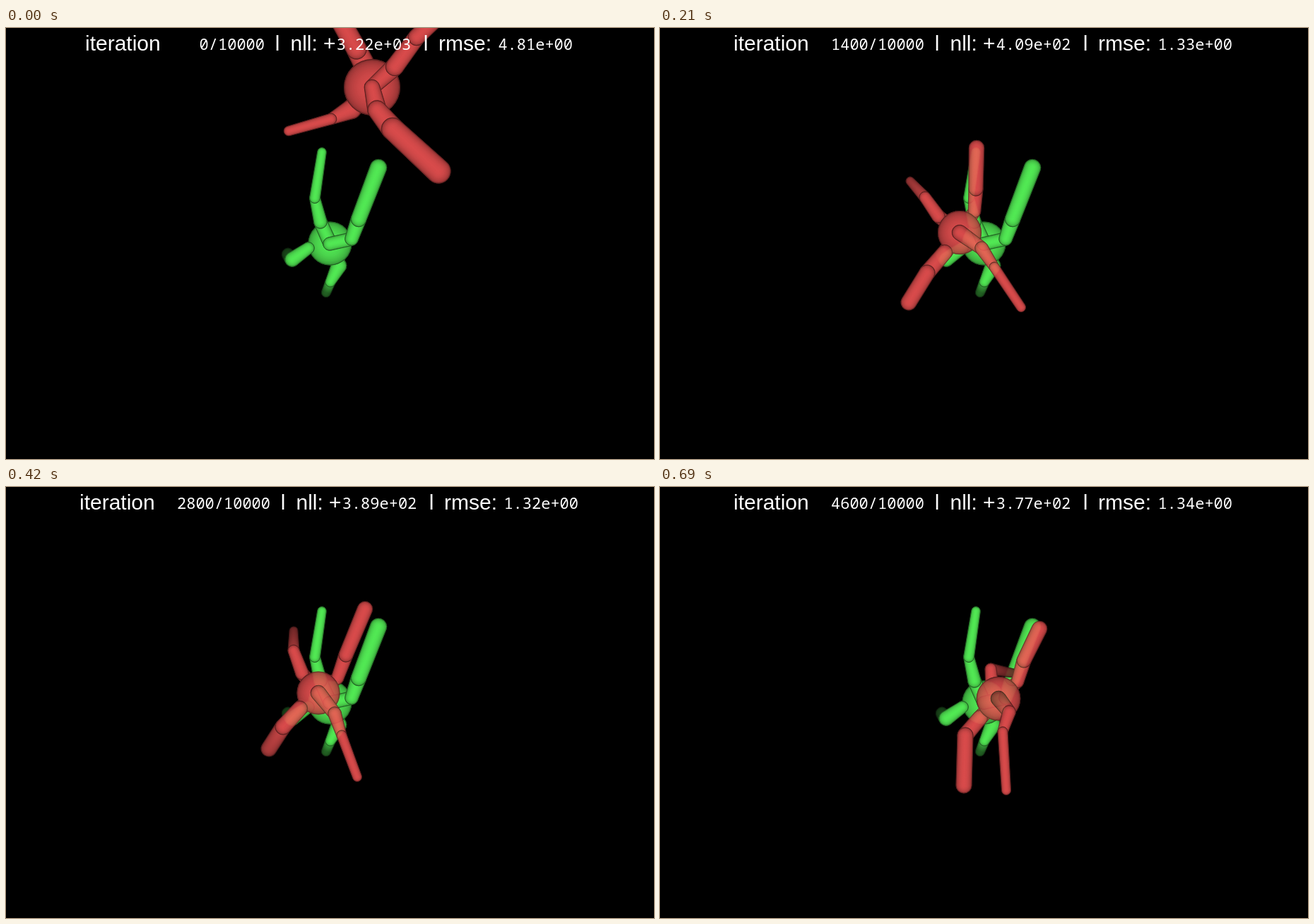
Write an HTML page with a canvas that moves like this. It is 917 px wide and 611 px high and loops after 1.72 s.

```html
<!DOCTYPE html>
<html lang="en">
<head>
<meta charset="utf-8">
<title>Pose fit</title>
<style>
html, body { margin: 0; width: 100%; height: 100%; overflow: hidden; background: #000; }
canvas { display: block; }
</style>
</head>
<body>
<canvas id="stage" width="917" height="611"></canvas>
<script>
const W = 917, H = 611, LOOP = 1720, STEP = 30, LAST = 23;
const stage = document.getElementById('stage').getContext('2d');
const layerCanvas = document.createElement('canvas');
layerCanvas.width = W;
layerCanvas.height = H;
const layer = layerCanvas.getContext('2d');

const RED = [246, 86, 86], GREEN = [82, 232, 84];
const SANS = '30px "Liberation Sans", Arial, sans-serif';
const MONO = '22px "Noto Sans Mono", monospace';

// Steps at which the poses below are reached.
const KEYS = [0, 3, 7, 10, 14, 17, 23];
const NLL = [3220, 360, 409, 421, 389, 387, 377];
const RMSE = [4.81, 1.23, 1.33, 1.33, 1.32, 1.18, 1.34];

// Torso: x, y, radius.
const TORSO = [
  [518, 84, 40], [434, 295, 31.3], [424, 290, 31], [432, 276, 30.5],
  [442, 292, 30.5], [436, 284, 31], [479, 300, 31.3]
];

// Legs: hip, knee and foot positions.
const UP = [
  [550, 55, 581, 13, 628, -32],
  [461, 271, 468, 238, 480, 170],
  [445, 260, 447, 228, 448, 170],
  [457, 250, 461, 217, 477, 155],
  [469, 271, 481, 238, 508, 173],
  [455, 252, 455, 221, 463, 162],
  [506, 276, 515, 246, 537, 201]
];
const LEFT = [
  [505, 48, 496, 30, 468, -20],
  [412, 268, 392, 236, 353, 193],
  [394, 267, 375, 240, 354, 217],
  [407, 252, 395, 220, 396, 198],
  [419, 264, 407, 232, 407, 204],
  [413, 266, 398, 246, 419, 246],
  [470, 285, 468, 258, 500, 264]
];
const DOWN = [
  [489, 115, 460, 129, 400, 146],
  [407, 318, 387, 352, 349, 381],
  [403, 318, 378, 347, 352, 389],
  [408, 301, 387, 331, 371, 375],
  [416, 314, 392, 340, 372, 371],
  [415, 314, 405, 346, 411, 408],
  [453, 327, 432, 352, 430, 423]
];
const RIGHT = [
  [525, 116, 547, 143, 612, 203],
  [459, 323, 473, 353, 489, 400],
  [455, 312, 473, 339, 511, 396],
  [457, 300, 470, 333, 500, 394],
  [465, 321, 475, 352, 497, 411],
  [460, 299, 475, 327, 524, 387],
  [494, 319, 485, 347, 490, 430]
];
const LEFT_SHADE = [1, 0.95, 0.7, 0.45, 0.55, 0.3, 0.4];
const DOWN_SHADE = [1, 1, 1, 1, 0.8, 1, 1];

const mix = (a, b, t) => a + (b - a) * t;
const mixAll = (a, b, t) => a.map((v, i) => mix(v, b[i], t));
const tone = (rgb, k) => `rgb(${rgb.map(v => Math.min(255, Math.round(v * k))).join(',')})`;
const node = (x, y, r, shade = 1) => ({ x, y, r, shade });

function hull(g, a, b, f) {
  const ra = a.r * f, rb = b.r * f;
  const dx = b.x - a.x, dy = b.y - a.y, d = Math.hypot(dx, dy);
  g.beginPath();
  if (d <= Math.abs(ra - rb) + 0.01) {
    const big = ra > rb ? a : b;
    g.arc(big.x, big.y, Math.max(ra, rb), 0, Math.PI * 2);
    return;
  }
  const dir = Math.atan2(dy, dx), phi = Math.acos((ra - rb) / d);
  g.arc(b.x, b.y, rb, dir - phi, dir + phi);
  g.arc(a.x, a.y, ra, dir + phi, dir - phi + Math.PI * 2);
  g.closePath();
}

// Rounded, tapered solid lit from the viewer.
function capsule(g, rgb, a, b = a) {
  const paint = k => {
    if (a === b || a.shade === b.shade) return tone(rgb, k * a.shade);
    const grad = g.createLinearGradient(a.x, a.y, b.x, b.y);
    grad.addColorStop(0, tone(rgb, k * a.shade));
    grad.addColorStop(1, tone(rgb, k * b.shade));
    return grad;
  };
  const n = a === b ? 20 : 12;
  for (let i = 0; i < n; i++) {
    const f = 1 - i / n;
    hull(g, a, b, f);
    g.fillStyle = paint(0.56 + 0.44 * Math.sqrt(1 - f * f));
    g.fill();
  }
  hull(g, a, b, 0.985);
  g.strokeStyle = paint(0.4);
  g.lineWidth = 0.9;
  g.stroke();
}

function limb(g, rgb, [hip, knee, foot]) {
  const thigh = () => capsule(g, rgb, hip, knee);
  const shin = () => capsule(g, rgb, knee, foot);
  if (foot.shade < 0.9) { shin(); capsule(g, rgb, hip, { ...knee, shade: 1 }); }
  else { thigh(); shin(); }
}

// Each leg: joints, over (drawn before the torso or after it), stub (where it starts when visible).
function creature(g, rgb, torso, legs) {
  const rear = node(torso.x, torso.y, torso.r * 0.3);
  for (const leg of legs) {
    if (!leg.stub) capsule(g, rgb, rear, leg.joints[0]);
    if (!leg.over) limb(g, rgb, leg.joints);
  }
  capsule(g, rgb, torso);
  for (const leg of legs) {
    if (leg.stub) capsule(g, rgb, leg.stub, leg.joints[0]);
    if (leg.over) limb(g, rgb, leg.joints);
  }
}

const GREEN_TORSO = node(458.5, 305.5, 31);
const GREEN_LEGS = [
  { joints: [node(428, 312, 8.5), node(405, 328, 10.5, 0.95), node(399, 321, 9, 0.3)], over: true },
  { joints: [node(471, 337, 11), node(459, 360, 7.2, 0.85), node(453, 375, 6.8, 0.42)] },
  { joints: [node(445, 275, 9.5), node(437, 241, 7.6), node(447, 176, 6.5)],
    over: true, stub: node(458, 304, 10) },
  { joints: [node(489, 299, 9.5), node(499, 271, 11), node(527, 198, 12)],
    over: true, stub: node(458, 306, 9.5) }
];

function moment(step) {
  let i = 0;
  while (i < KEYS.length - 2 && step >= KEYS[i + 1]) i++;
  let t = (step - KEYS[i]) / (KEYS[i + 1] - KEYS[i]);
  if (i === 0) t = 1 - (1 - t) ** 3;
  return { i, t, near: i === 0 ? 1 - t : 0 };
}

function redLegs(step, torso, { i, t, near }) {
  const at = track => Array.isArray(track[i])
    ? mixAll(track[i], track[i + 1], t) : mix(track[i], track[i + 1], t);
  const joints = (track, radii, closeRadii, shade = 1) => {
    const p = at(track), r = mixAll(radii, closeRadii, near);
    const kneeShade = shade < 0.9 ? mix(shade, 1, 0.5) : 1;
    return [
      node(p[0], p[1], r[0]),
      node(p[2], p[3], r[1], kneeShade),
      node(p[4], p[5], r[2], shade)
    ];
  };
  const stub = (r, shade) => node(torso.x, torso.y, r, shade);
  const early = step < 2, leftFront = !early && step < 5;
  const left = {
    joints: joints(LEFT, [9.5, 8.2, 6.2], [15, 14.5, 14], at(LEFT_SHADE)),
    over: leftFront, stub: leftFront && stub(11)
  };
  const up = {
    joints: joints(UP, [9, 10.3, 11], [13, 12, 12]),
    over: early, stub: early && stub(11)
  };
  const down = {
    joints: joints(DOWN, [10.8, 11.3, 11.3], [14, 8, 7], at(DOWN_SHADE)),
    over: step > 1 && step < 16
  };
  const right = {
    joints: joints(RIGHT, [9.5, 7.2, 6.7], [13.5, 16, 17.5]),
    over: !leftFront, stub: !leftFront && stub(11, step > 20 ? 0.7 : 1)
  };
  return [left, up, down, right];
}

const sci = v => v.toExponential(2).replace(/e\+(\d)$/, 'e+0$1');

function caption(step, { i, t }) {
  const count = String(step * 200);
  const s = 2.67 * (4 - count.length);
  const nll = Math.exp(mix(Math.log(NLL[i]), Math.log(NLL[i + 1]), t));
  const put = (text, font, x, y, align = 'left') => {
    stage.font = font;
    stage.textAlign = align;
    stage.fillText(text, x, y);
  };
  stage.fillStyle = '#fff';
  put('iteration', SANS, 104 + s, 32);
  put(count + '/10000', MONO, 374 - s, 31, 'right');
  put('l', SANS, 392 - s, 32, 'center');
  put('nll:', SANS, 410.5 - s, 32);
  put('+', SANS, 457 - s, 32);
  put(sci(nll), MONO, 528.5 - s, 31, 'center');
  put('l', SANS, 602 - s, 32, 'center');
  put('rmse:', SANS, 620 - s, 32);
  put(sci(mix(RMSE[i], RMSE[i + 1], t)), MONO, 757.2 - s, 31, 'center');
}

function draw(time) {
  const step = Math.min(LAST, Math.floor(time / STEP));
  const m = moment(step);
  const torso = node(...mixAll(TORSO[m.i], TORSO[m.i + 1], m.t));

  stage.fillStyle = '#000';
  stage.fillRect(0, 0, W, H);
  creature(stage, GREEN, GREEN_TORSO, GREEN_LEGS);

  layer.clearRect(0, 0, W, H);
  creature(layer, RED, torso, redLegs(step, torso, m));
  stage.globalAlpha = 0.88;
  stage.drawImage(layerCanvas, 0, 0);
  stage.globalAlpha = 1;

  caption(step, m);
}

const start = performance.now();
function tick() {
  draw((performance.now() - start) % LOOP);
  requestAnimationFrame(tick);
}
tick();
</script>
</body>
</html>
```
